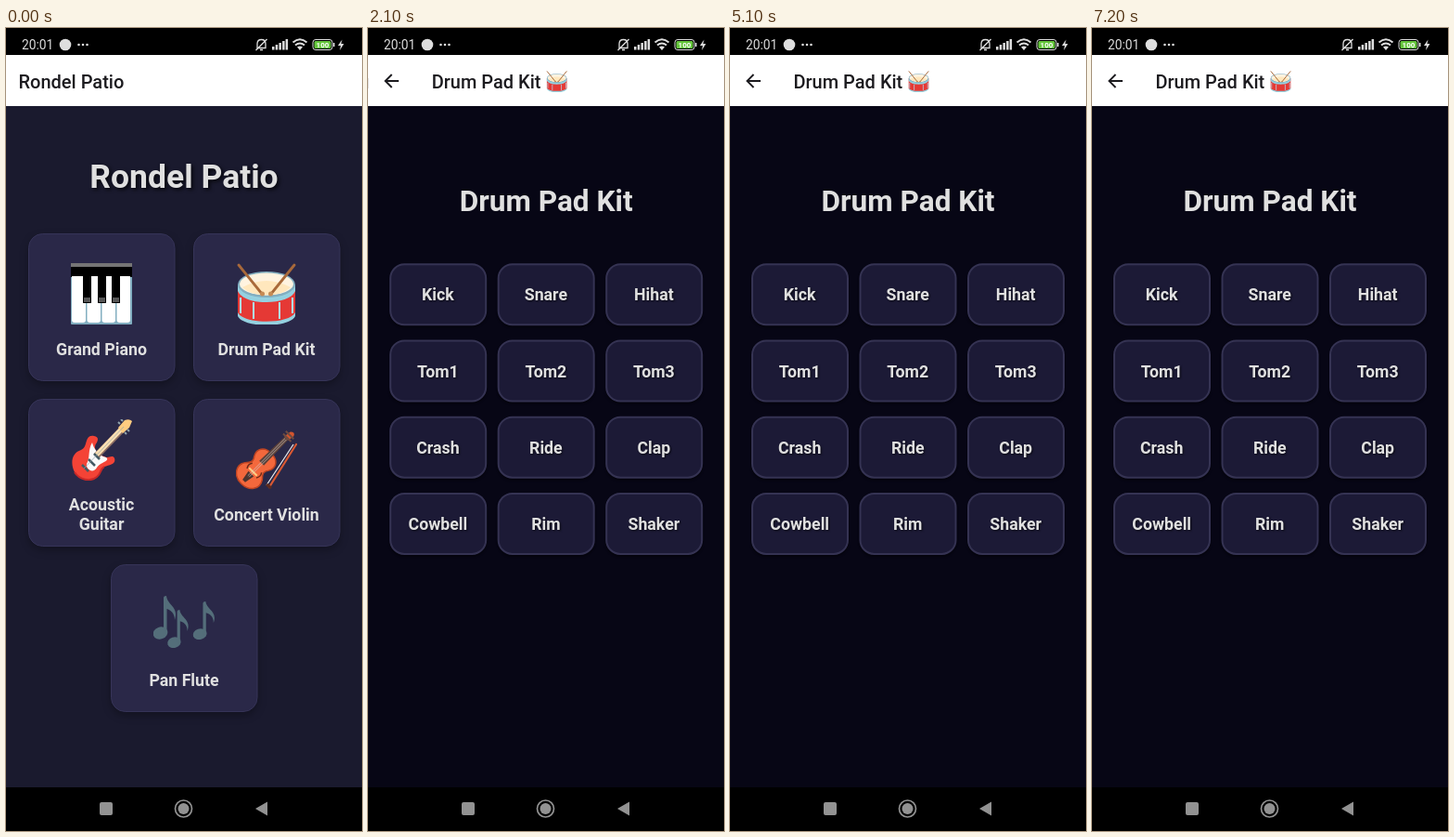
An HTML page for the animation above (8 s loop, 384x864 px).

```html
<!DOCTYPE html>
<html lang="en">
<head>
<meta charset="utf-8">
<title>Instrument pads</title>
<style>
html, body { margin: 0; width: 100%; height: 100%; overflow: hidden; background: #000; }
svg { display: block; }
#stage { width: 384px; height: 864px; }
text { font-family: Roboto, "Noto Sans", sans-serif; }
.bar { font-size: 20px; font-weight: 500; fill: #1c1b1f; }
.title, .label { font-weight: 700; fill: #e0e0e0; text-anchor: middle; }
.title { filter: drop-shadow(2px 2px 2px rgba(0,0,0,.75)); }
.label { font-size: 17.75px; }
.kit .title { filter: none; }
.kit .label { filter: drop-shadow(1px 1px 1px rgba(0,0,0,.7)); }
.card { fill: #2a2848; stroke: #363458; stroke-width: 1; filter: drop-shadow(0 4px 4px rgba(0,0,0,.28)); }
.pad { fill: #1c1a36; stroke: #353353; stroke-width: 2; filter: drop-shadow(0 2px 1px rgba(0,0,0,.4)); }
</style>
</head>
<body>
<svg id="stage" viewBox="0 0 384 864">
  <defs>
    <clipPath id="window"><rect y="29" width="384" height="788"/></clipPath>

    <symbol id="piano" viewBox="0 0 66 66">
      <rect width="66" height="66" rx="1" fill="#82aec0"/>
      <rect width="66" height="5" fill="#757575"/>
      <rect y="4" width="66" height="11" fill="#000"/>
      <g fill="#fff">
        <path d="M1 14H16V61Q16 64 13 64H4Q1 64 1 61Z"/>
        <path d="M17.5 14H32V61Q32 64 29 64H20.5Q17.5 64 17.5 61Z"/>
        <path d="M33.5 14H48V61Q48 64 45 64H36.5Q33.5 64 33.5 61Z"/>
        <path d="M49.5 14H64V61Q64 64 61 64H52.5Q49.5 64 49.5 61Z"/>
      </g>
      <path d="M13 13h9v30h-9zM29 13h9v30h-9zM44 13h9v30h-9z" fill="#000"/>
      <path d="M14 37h7v5h-7zM30 37h7v5h-7zM45 37h7v5h-7z" fill="#555"/>
    </symbol>

    <symbol id="drum" viewBox="0 0 66 66">
      <path d="M2 24V54C8 69 58 69 64 54V24Z" fill="#e53935"/>
      <path d="M2 53C8 66 58 66 64 53V57C58 70 8 70 2 57Z" fill="#94d1e0"/>
      <path d="M2 23V30C8 46 58 46 64 30V23Z" fill="#94d1e0"/>
      <path d="M5 37v17M19 42v18M47 42v18M61 37v17" stroke="#b3e5fc" stroke-width="2"/>
      <ellipse cx="33" cy="23" rx="31" ry="14" fill="#82aec0"/>
      <ellipse cx="33" cy="22.500" rx="29" ry="12" fill="#fff3e0"/>
      <path d="M7 26Q33 12 59 26Q50 34.500 33 34.500Q16 34.500 7 26Z" fill="#ffe7bd"/>
      <g stroke="#a8693a" stroke-width="2.800" stroke-linecap="round">
        <path d="M3 2L28 33M63 2L38 33"/>
      </g>
      <g fill="#c58b55"><circle cx="28.500" cy="33" r="2.500"/><circle cx="37.500" cy="33" r="2.500"/></g>
    </symbol>

    <symbol id="guitar" viewBox="0 0 66 66">
      <path d="M25 18C14 16 19 30 11 33C1 36-1 47 4 57C9 65 21 68 28 62C33 58 31 54 36 51C42 49 49 48 47 42C45 37 40 43 36 40C28 39 23 31 28 25Q31 19 25 18Z" fill="#f44336"/>
      <path d="M4 57C9 65 21 68 28 62C33 58 31 54 36 51" fill="none" stroke="#c62828" stroke-width="2"/>
      <path d="M23 25C24 31 31 40 38 41C43 45 32 46 28 52C24 59 16 54 17 48C21 42 18 33 23 25Z" fill="#fafafa"/>
      <path d="M27 40L55 11" stroke="#8d6e63" stroke-width="7"/>
      <path d="M27 39L55 10" stroke="#ffe0b2" stroke-width="5"/>
      <path d="M51 9L58 1Q63-1 66 2L63 9L56 15Z" fill="#ffcc80"/>
      <path d="M53 5l-2-2M56 2l-2-2M61 11l2 2M58 14l2 2" stroke="#90a4ae" stroke-width="2"/>
      <path d="M12 49l7 7M19 43l7 7M25 37l6 6" stroke="#455a64" stroke-width="2.500"/>
      <path d="M14 53L57 8" stroke="#90a4ae" stroke-width=".7"/>
    </symbol>

    <symbol id="violin" viewBox="0 0 66 66">
      <g transform="translate(22 43) rotate(45)">
        <path d="M0-23C11-23 15-15 11-8C7-3 9 0 13 4C19 13 12 23 0 23C-12 23-19 13-13 4C-9 0-7-3-11-8C-15-15-11-23 0-23Z" fill="#f4683c" stroke="#bf4422" stroke-width="1.500"/>
        <path d="M-2.500-47H2.500L3.500-8H-3.500Z" fill="#5d4037"/>
        <path d="M-3-46L-2-54Q2-58 4-53L3-46Z" fill="#d4552e"/>
        <path d="M-6-51H6M-6-47H6" stroke="#6d4c41" stroke-width="2"/>
        <path d="M-4 8H4L2 19H-2Z" fill="#4e342e"/>
        <path d="M-6 5H6" stroke="#ffcc80" stroke-width="2"/>
        <path d="M-7-1q-3 4 0 8M7-1q3 4 0 8" fill="none" stroke="#6d2c19" stroke-width="1.500"/>
        <path d="M-1-45V12M1-45V12" stroke="#cfd8dc" stroke-width=".6"/>
      </g>
      <path d="M65 17L36 63" stroke="#d95832" stroke-width="2.200" stroke-linecap="round"/>
      <path d="M62 17L33 61" stroke="#eceff1" stroke-width="1.200"/>
      <path d="M33 60l5 4" stroke="#5d2b1c" stroke-width="3"/>
    </symbol>

    <g id="note" fill="#546e7a">
      <ellipse cx="7.500" cy="40" rx="8" ry="6.500" transform="rotate(-20 7.500 40)"/>
      <path d="M11 2Q11 0 14 0C15 10 28 12 23 26C23 18 18 15 14.500 14V40H11Z"/>
    </g>
    <symbol id="notes" viewBox="0 0 66 66">
      <use href="#note" y="2"/>
      <use href="#note" transform="translate(15.500 17) scale(.92 .88)"/>
      <use href="#note" transform="translate(43 8) scale(.95 .88)"/>
    </symbol>
  </defs>

  <rect width="384" height="864"/>
  <g clip-path="url(#window)">
    <g id="home"></g>
    <g id="kit" class="kit"></g>
  </g>

  <g fill="#dedede">
    <text x="17" y="23" font-size="13.800">20:01</text>
    <circle cx="64" cy="18" r="6.300"/>
    <circle cx="78.500" cy="18" r="1.300"/><circle cx="83" cy="18" r="1.300"/><circle cx="87.500" cy="18" r="1.300"/>
    <path d="M271 21.500V17C271 11 280 11 280 17V21.500Z" fill="none" stroke="#dedede" stroke-width="1.300"/>
    <path d="M274 23.500h3M269.500 24L281.500 12" stroke="#dedede" stroke-width="1.400"/>
    <path d="M287 20h2.500v3.500H287zM290.700 18h2.500v5.500h-2.500zM294.400 16h2.500v7.500h-2.500zM298.100 14h2.500v9.500h-2.500zM301.600 12h2.500v11.500h-2.500z"/>
    <g fill="none" stroke="#dedede" stroke-width="2">
      <path d="M309.500 15.500Q317 9 324.500 15.500M312 18.500Q317 14.500 322 18.500"/>
    </g>
    <path d="M314 20.500Q317 18.500 320 20.500L317 24Z"/>
    <rect x="331" y="12.500" width="21" height="11" rx="3" fill="#000" stroke="#dedede"/>
    <rect x="332.500" y="14" width="18" height="8" rx="1.500" fill="#65c63c"/>
    <rect x="353" y="16" width="1.500" height="4"/>
    <text x="341.500" y="21" font-size="8" font-weight="700" text-anchor="middle" fill="#fff">100</text>
    <path d="M362.500 12.500L358 19H361L360 24L364.500 17H361.500Z"/>
  </g>

  <g fill="#929292">
    <rect x="101" y="833" width="14" height="14" rx="2"/>
    <circle cx="191.500" cy="840" r="9" fill="none" stroke="#929292" stroke-width="1.700"/>
    <circle cx="191.500" cy="840" r="6"/>
    <path d="M269 840L282 832.500V847.500Z"/>
  </g>
</svg>

<script>
const $ = id => document.getElementById(id);
const LOOP = 8000, STEP = 100;
const SLIDE_AT = 1735, SLIDE_MS = 450, SHIFT = 38.4;

const label = (x, y, s) => `<text class="label" x="${x}" y="${y}">${s}</text>`;
const title = (y, size, s) => `<text class="title" x="192" y="${y}" font-size="${size}">${s}</text>`;
const icon = (id, x, y, size) => `<use href="#${id}" x="${x}" y="${y}" width="${size}" height="${size}"/>`;
const page = (bg, w) => `<rect y="84" width="${w}" height="733" fill="${bg}"/><rect y="29" width="${w}" height="55" fill="#fff"/>`;

const cards = [
  ["piano", 24, 221, "Grand Piano"], ["drum", 202, 221, "Drum Pad Kit"],
  ["guitar", 24, 399, "Acoustic", "Guitar"], ["violin", 202, 399, "Concert Violin"],
  ["notes", 113, 577, "Pan Flute"]
];
const card = ([id, x, y, a, b]) => `<g id="card-${id}">
  <rect class="card" x="${x + .5}" y="${y + .5}" width="157.500" height="158" rx="15"/>
  ${icon(id, x + 46, y + (b ? 22 : 32), 66)}
  ${b ? label(x + 79, y + 120, a) + label(x + 79, y + 141, b) : label(x + 79, y + 130.7, a)}</g>`;

$("home").innerHTML = `<rect x="384" y="29" width="40" height="788" fill="#2c2c34"/>`
  + page("#1a1a2e", 386)
  + `<text class="bar" x="13.500" y="64.500">Rondel Patio</text>`
  + title(171.5, 35.5, "Rondel Patio")
  + cards.map(card).join("");

const pads = "Kick Snare Hihat Tom1 Tom2 Tom3 Crash Ride Clap Cowbell Rim Shaker".split(" ");
const pad = (name, i) => {
  const x = 23 + i % 3 * 116.5, y = 253.3 + Math.floor(i / 3) * 82.2;
  return `<g id="${name}"><rect class="pad" x="${x + 1}" y="${y + 1}" width="103" height="65" rx="15"/>
    ${label(x + 52.2, y + 40, name)}</g>`;
};

$("kit").innerHTML = page("#070615", 384)
  + `<path d="M33 57H19M25.500 50L18.500 57L25.500 64" fill="none" stroke="#1c1b1f" stroke-width="1.900"/>`
  + `<text class="bar" x="68.500" y="64.500">Drum Pad Kit</text>`
  + icon("drum", 192, 46, 23)
  + title(197, 31.6, "Drum Pad Kit")
  + pads.map(pad).join("");

// [element, pressed from, released at]
const taps = [
  ["card-drum", 1500, 1700],
  ["Kick", 2800, 3100], ["Kick", 3700, 4000], ["Clap", 4300, 4500],
  ["Tom3", 4900, 5000], ["Tom1", 5000, 5100], ["Crash", 5600, 5800],
  ["Clap", 5900, 6000], ["Shaker", 6400, 6500], ["Cowbell", 7100, 7200]
];
const tapped = [...new Set(taps.map(t => t[0]))];

const clamp = v => Math.min(1, Math.max(0, v));
const bezier = (a, b, c, d, u) => {
  const v = 1 - u;
  return a * v * v * v + 3 * b * v * v * u + 3 * c * v * u * u + d * u * u * u;
};

// Two joined curves: quick start, very slow settle
function ease(x) {
  const [xs, ys] = x < 1 / 6
    ? [[0, .05, .1333, 1 / 6], [0, 0, .06, .4]]
    : [[1 / 6, .2083, .25, 1], [.4, .82, 1, 1]];
  let lo = 0, hi = 1;
  for (let i = 0; i < 24; i++) {
    const mid = (lo + hi) / 2;
    if (bezier(...xs, mid) < x) lo = mid; else hi = mid;
  }
  return bezier(...ys, lo);
}

function render(t) {
  const since = t - SLIDE_AT;
  const p = ease(clamp(since / SLIDE_MS));
  $("home").setAttribute("transform", `translate(${-SHIFT * p})`);
  $("kit").setAttribute("transform", `translate(${SHIFT * (1 - p)})`);
  $("kit").setAttribute("opacity", clamp((since - 50) / 83));
  for (const id of tapped) {
    const down = taps.some(([n, a, b]) => n === id && t >= a && t < b);
    $(id).setAttribute("opacity", down ? .7 : 1);
  }
}

const start = performance.now();
function frame() {
  const t = (performance.now() - start) % LOOP;
  render(Math.floor(t / STEP) * STEP);
  requestAnimationFrame(frame);
}
frame();
</script>
</body>
</html>
```
